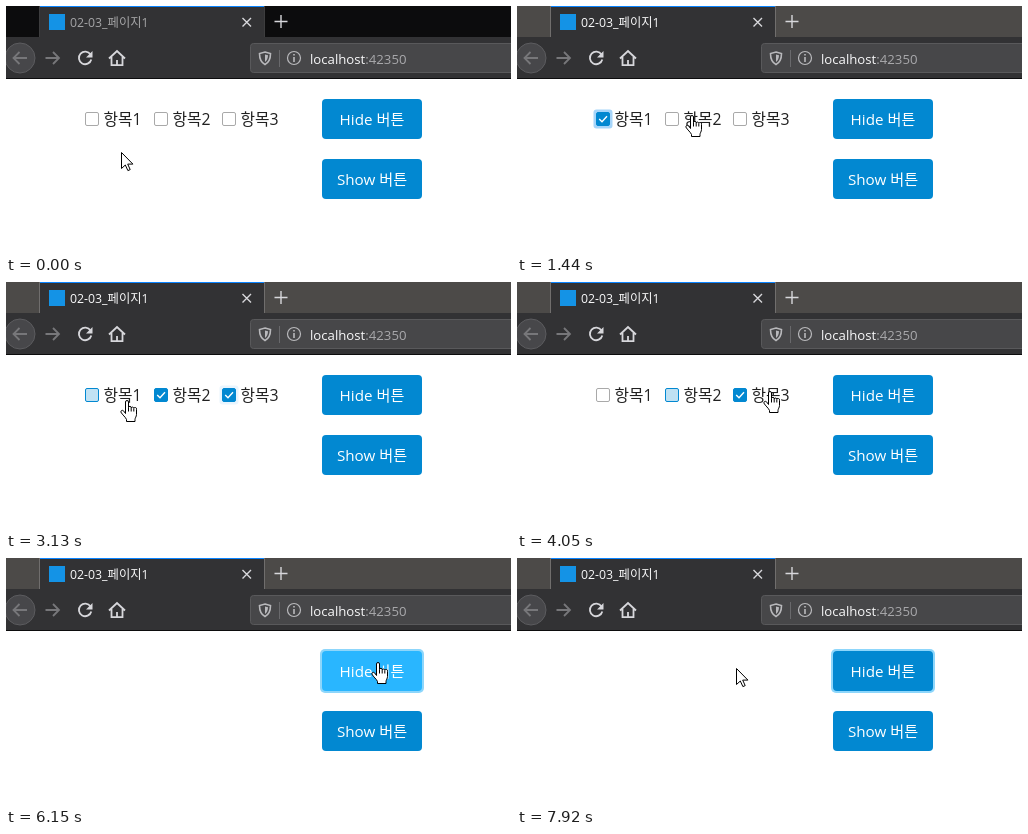
Write an HTML page that moves like this. It is 505x248 px and loops after 8000 ms.

```html
<!DOCTYPE html>
<html lang="ko">
<head>
<meta charset="utf-8">
<title>페이지1</title>
<style>
html, body { margin: 0; width: 100%; height: 100%; overflow: hidden; background: #fff; }
svg { display: block; width: 505px; height: 248px; }
text { font-family: "Open Sans", "Noto Sans CJK KR", "Noto Sans CJK", sans-serif; }
.line { fill: none; stroke: #d7d7db; stroke-width: 1.8; }
.thin { stroke-width: 1.4; }
.dim { stroke: #77777a; }
.info { fill: none; stroke: #b9b9bc; stroke-width: 1.2; }
.label { font-size: 15.8px; fill: #212121; }
.btn { font-size: 15.2px; fill: #fff; text-anchor: middle; }
.box { fill: #fff; stroke: #a9a9a9; }
.tick { fill: none; stroke: #fff; stroke-width: 1.4; opacity: 0; }
.glow { fill: #a6d5fa; opacity: 0; }
.button { fill: #0288d1; }
.pointer { fill: #fff; stroke: #000; stroke-linejoin: round; }

/* One 8 s clock: 1% = 80 ms */
svg * { animation: 8s linear infinite; }
.bar { animation-name: bar; animation-timing-function: step-end; }
.title { animation-name: title; animation-timing-function: step-end; }
.items { animation-name: items; }
#c1 .box { animation-name: box1; }
#c2 .box { animation-name: box2; }
#c3 .box { animation-name: box3; }
#c1 .tick { animation-name: tick1; }
#c2 .tick { animation-name: tick2; }
#c3 .tick { animation-name: tick3; }
#c1 .glow { animation-name: glow1; }
#c2 .glow { animation-name: glow2; }
#c3 .glow { animation-name: glow3; }
.hide { animation-name: hide; }
.show { animation-name: show; }
.ring { animation-name: ring; }
.cursor { animation-name: move; animation-timing-function: step-end; }
.hand { animation-name: hand; animation-timing-function: step-end; }
.arrow { animation-name: arrow; animation-timing-function: step-end; }

@keyframes bar { 0% { fill: #0c0c0d; } 8.25%, 100% { fill: #4c4a48; } }
@keyframes title { 0% { fill: #a5a5a7; } 8.25%, 100% { fill: #f9f9fa; } }
@keyframes items { 0%, 74.1% { opacity: 1; } 74.15%, 100% { opacity: 0; } }

@keyframes box1 {
  0%, 9.25% { fill: #fff; stroke: #a9a9a9; }
  12%, 37.1% { fill: #0288d1; stroke: #0288d1; }
  39.8%, 48.7% { fill: #fff; stroke: #0288d1; }
  50.4%, 100% { fill: #fff; stroke: #a9a9a9; }
}
@keyframes box2 {
  0%, 20.9% { fill: #fff; stroke: #a9a9a9; }
  23.5%, 48.7% { fill: #0288d1; stroke: #0288d1; }
  51.3%, 53.5% { fill: #fff; stroke: #0288d1; }
  55.2%, 100% { fill: #fff; stroke: #a9a9a9; }
}
@keyframes box3 {
  0%, 24.7% { fill: #fff; stroke: #a9a9a9; }
  26%, 30.5% { fill: #fff; stroke: #0288d1; }
  33.2%, 53.5% { fill: #0288d1; stroke: #0288d1; }
  56.2%, 100% { fill: #fff; stroke: #0288d1; }
}
@keyframes tick1 { 0%, 9.3% { opacity: 0; } 9.4%, 37.1% { opacity: 1; } 37.2%, 100% { opacity: 0; } }
@keyframes tick2 { 0%, 20.9% { opacity: 0; } 21%, 48.7% { opacity: 1; } 48.8%, 100% { opacity: 0; } }
@keyframes tick3 { 0%, 30.5% { opacity: 0; } 30.6%, 53.5% { opacity: 1; } 53.6%, 100% { opacity: 0; } }
@keyframes glow1 { 0%, 9.25% { opacity: 0; } 12%, 20.9% { opacity: 1; } 23.5%, 100% { opacity: 0; } }
@keyframes glow2 { 0%, 20.9% { opacity: 0; } 23.5%, 30.5% { opacity: 1; } 33.2%, 100% { opacity: 0; } }
@keyframes glow3 { 0%, 30.5% { opacity: 0; } 33.2%, 37.1% { opacity: 1; } 39.8%, 100% { opacity: 0; } }

@keyframes hide {
  0%, 62% { fill: #0288d1; }
  64.2%, 93.2% { fill: #29b6ff; }
  96%, 100% { fill: #0288d1; }
}
@keyframes show {
  0%, 57.5% { fill: #0288d1; }
  59.5%, 60.5% { fill: #29b6ff; }
  63%, 100% { fill: #0288d1; }
}
@keyframes ring { 0%, 74.1% { opacity: 0; } 76.8%, 100% { opacity: 1; } }

@keyframes move {
  0% { transform: translate(115px, 146px); animation-timing-function: steps(6); }
  5.375%, 13.25% { transform: translate(92px, 117px); }
  13.25% { animation-timing-function: steps(5); }
  18% { transform: translate(173px, 109px); }
  18.875%, 20% { transform: translate(181px, 97px); }
  20% { animation-timing-function: steps(6); }
  25.625%, 27.5% { transform: translate(228px, 113px); }
  28.4% { transform: translate(231px, 112px); }
  29.5% { transform: translate(214px, 111px); animation-timing-function: steps(2); }
  31.25% { transform: translate(165px, 100px); animation-timing-function: steps(3); }
  34.25%, 36.25% { transform: translate(119px, 118px); }
  36.25% { animation-timing-function: steps(5); }
  41% { transform: translate(176px, 101px); }
  46.75%, 47.875% { transform: translate(168px, 99px); }
  47.875% { animation-timing-function: steps(3); }
  50.625% { transform: translate(251px, 109px); }
  51.625%, 53.5% { transform: translate(257px, 111px); }
  53.5% { animation-timing-function: steps(2); }
  55.5% { transform: translate(300px, 125px); animation-timing-function: steps(3); }
  58.5% { transform: translate(395px, 165px); }
  59.5% { transform: translate(403px, 168px); animation-timing-function: steps(2); }
  61.25% { transform: translate(385px, 135px); animation-timing-function: steps(2); }
  63.25% { transform: translate(368px, 105px); }
  67.25%, 90.375% { transform: translate(370px, 104px); }
  90.375% { animation-timing-function: steps(9); }
  99%, 100% { transform: translate(219px, 110px); }
}
@keyframes hand {
  0% { opacity: 0; } 5.375% { opacity: 1; } 54.5% { opacity: 0; } 57% { opacity: 1; }
  61.25% { opacity: 0; } 62.2% { opacity: 1; } 93.2%, 100% { opacity: 0; }
}
@keyframes arrow {
  0% { opacity: 1; } 5.375% { opacity: 0; } 54.5% { opacity: 1; } 57% { opacity: 0; }
  61.25% { opacity: 1; } 62.2% { opacity: 0; } 93.2%, 100% { opacity: 1; }
}
</style>
</head>
<body>
<svg viewBox="0 0 505 248">
  <!-- browser window -->
  <rect y="31" width="505" height="42" fill="#323234"/>
  <rect class="bar" width="505" height="31"/>
  <rect x="34" width="224" height="31" fill="#323234"/>
  <rect x="34" width="224" height="1" fill="#0a84ff"/>
  <path d="M33.500 0v31M258.500 0v31" stroke="#fff" opacity=".2"/>
  <rect y="72" width="505" height="1" fill="#0c0c0d"/>
  <rect x="43" y="8" width="16" height="16" fill="#1493e6"/>
  <text class="title" x="64" y="20.500" font-size="12.300">02-03_페이지1</text>
  <path class="line thin" d="M236.500 12l8.500 8.500m0-8.500l-8.500 8.500M268.500 15.500h13m-6.500-6.500v13"/>

  <circle cx="14" cy="52" r="15" fill="#47474a" stroke="#5c5c5f"/>
  <path class="line dim" d="M21 52H7.500m6-6l-6 6 6 6M39.500 52h13.500m-6-6l6 6-6 6"/>
  <path class="line" d="M84.500 48.500a6.300 6.300 0 1 0 .8 5"/>
  <path d="M86.500 45v6.500H80z" fill="#d7d7db"/>
  <path class="line" d="M103 52.500l8-7.500 8 7.500M105.500 51v8.200h11V51M111 59v-5"/>

  <rect x="244.500" y="37.500" width="280" height="29" rx="3" fill="#474749" stroke="#59595b"/>
  <path class="info" style="stroke-width:1.600" d="M259 46l5.500 1.500c0 6-1.500 9-5.500 11-4-2-5.500-5-5.500-11z"/>
  <path d="M259 48.500v7.500c2-1.500 2.800-3.600 3-6.700z" fill="#b9b9bc"/>
  <path d="M273.500 44v17" stroke="#69696c"/>
  <circle class="info" cx="288" cy="52" r="6.500"/>
  <path class="info" style="stroke-width:1.600" d="M288 51v5M288 48v1.600"/>
  <text x="304" y="57.500" font-size="13.200" fill="#f9f9fa">localhost<tspan fill="#a9a9ac">:42350</tspan></text>

  <!-- page -->
  <g class="items">
    <g id="c1" transform="translate(79 106)">
      <rect class="glow" x="-2.500" y="-2.500" width="19" height="19" rx="3"/>
      <rect class="box" x=".5" y=".5" width="13" height="13" rx="1.500"/>
      <path class="tick" d="M3.200 7l2.800 2.800 5-5.600"/>
      <text class="label" x="18.500" y="13">항목1</text>
    </g>
    <g id="c2" transform="translate(148 106)">
      <rect class="glow" x="-2.500" y="-2.500" width="19" height="19" rx="3"/>
      <rect class="box" x=".5" y=".5" width="13" height="13" rx="1.500"/>
      <path class="tick" d="M3.200 7l2.800 2.800 5-5.600"/>
      <text class="label" x="18.500" y="13">항목2</text>
    </g>
    <g id="c3" transform="translate(216 106)">
      <rect class="glow" x="-2.500" y="-2.500" width="19" height="19" rx="3"/>
      <rect class="box" x=".5" y=".5" width="13" height="13" rx="1.500"/>
      <path class="tick" d="M3.200 7l2.800 2.800 5-5.600"/>
      <text class="label" x="18.500" y="13">항목3</text>
    </g>
  </g>
  <rect class="ring" x="314" y="91" width="104" height="44" rx="5" fill="#8dd6fb"/>
  <rect class="button hide" x="316" y="93" width="100" height="40" rx="4"/>
  <text class="btn" x="366" y="119">Hide 버튼</text>
  <rect class="button show" x="316" y="153" width="100" height="40" rx="4"/>
  <text class="btn" x="366" y="179">Show 버튼</text>

  <g class="cursor">
    <path class="pointer arrow" d="M.5 .5V16.500L4.300 13l2.600 5.600 2.300-1-2.500-5.500h5.200z"/>
    <g class="hand">
      <path class="pointer" transform="translate(-5 0)" d="M5.500 13.500V2a1.500 1.500 0 0 1 3 0V7.500a1.350 1.350 0 0 1 2.700.4a1.350 1.350 0 0 1 2.600.6a1.350 1.350 0 0 1 2.700.8V14.500c0 2-1.500 3.500-1.500 5V21.500H6.500V19.500C5.500 17 2.500 15 .8 12a1.600 1.600 0 0 1 2.600-1.300z"/>
      <path d="M3.500 7.500v4M6.200 8v3.500M8.800 9v2.500" fill="none" stroke="#000"/>
    </g>
  </g>
</svg>
</body>
</html>
```
